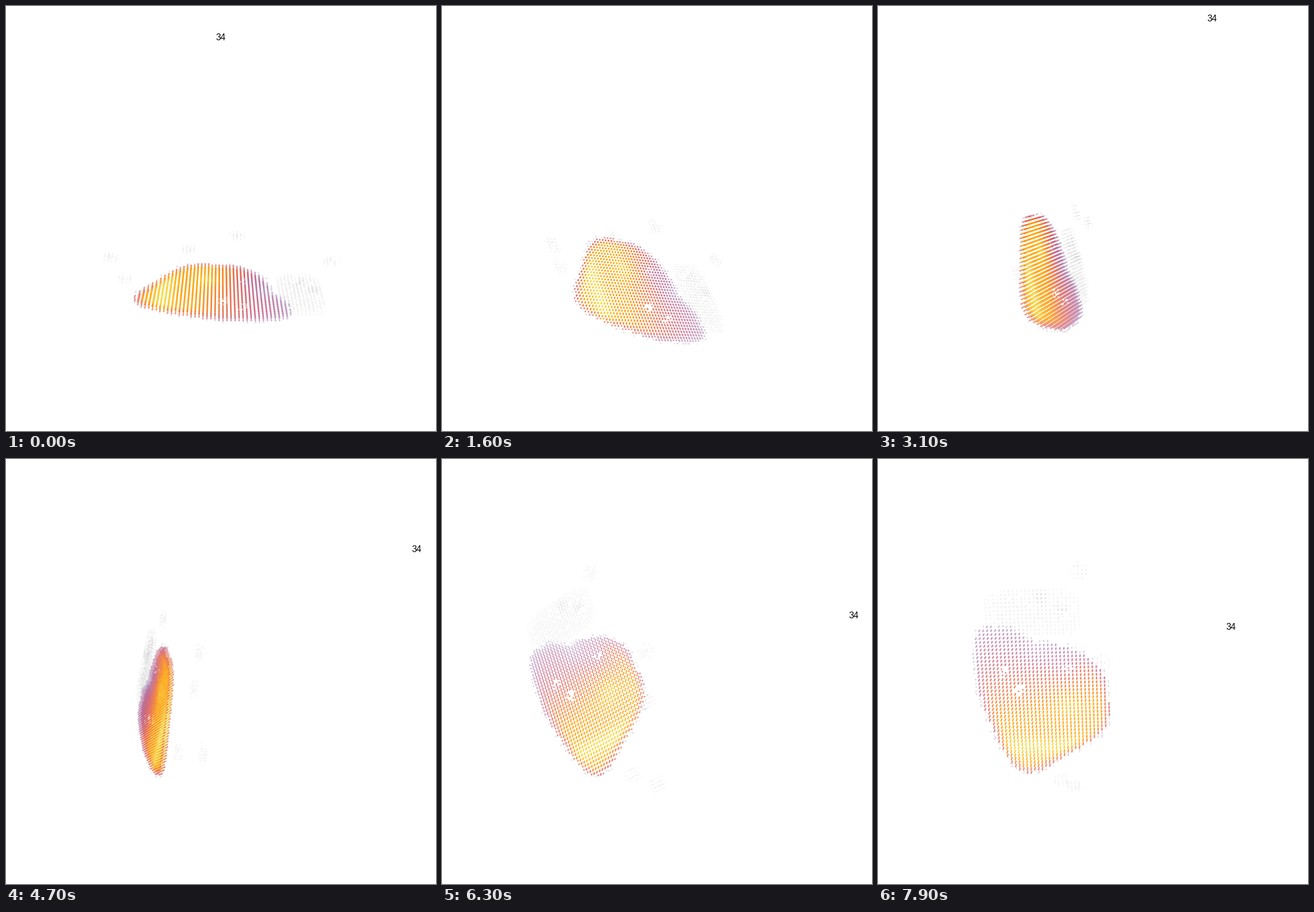
These frames come from a looping animation (753x744 px, 8000 ms). A matplotlib script:

```python
import numpy as np
import matplotlib.pyplot as plt
from matplotlib.animation import FuncAnimation
from matplotlib.path import Path

W, H, DPI = 753, 744, 100
FRAMES, INTERVAL = 80, 100
STEP = np.radians(3)            # 5 rpm at 10 fps
HALF_FOV = np.radians(15)
DIST = 1 / np.sin(HALF_FOV)
FOCAL = H / 2 / np.tan(HALF_FOV)
PITCH = 2 / np.sqrt(3) / 65
SLAB = -16 * PITCH              # height between the two heart layers
TILT = np.radians(290)
VIEW = np.array([[1, 0, 0],
                 [0, np.cos(TILT), -np.sin(TILT)],
                 [0, np.sin(TILT), np.cos(TILT)]])
LABEL_POS = np.array([[0, 0.77, 0.77]])
rng = np.random.default_rng(34)

KEYS = np.array([
    (.31, -.47), (.29, -.33), (.24, -.25), (.22, -.13), (.12, .035),
    (-.05, .08), (-.19, .055), (-.30, -.10), (-.395, -.27), (-.37, -.37),
    (-.20, -.45), (.05, -.52), (.24, -.51)])
HOLES = [(.01, -.325), (.10, -.395), (.11, -.10)]
DEBRIS = [(.54, -.04, -.22), (-.46, -.15, -.25), (-.53, -.10, -.165),
          (-.16, -.01, -.16), (.08, .05, -.10)]


def closed_curve(keys, n=16):
    """Catmull-Rom spline through the key points."""
    t = np.linspace(0, 1, n, endpoint=False)[:, None]
    a, b, c, d = (np.roll(keys, s, 0)[:, None] for s in (1, 0, -1, -2))
    curve = b + t / 2 * (c - a + t * (2 * a - 5 * b + 4 * c - d
                                      + t * (3 * (b - c) + d - a)))
    return curve.reshape(-1, 2)


RING = closed_curve(KEYS)


def bump(x, y, cx, cy, r):
    return np.exp(-((x - cx) ** 2 + (y - cy) ** 2) / (2 * r * r))


def lattice(lo, hi):
    k = np.arange(-32.5, 33) * PITCH
    axes = [k[(k >= a) & (k <= b)] for a, b in zip(lo, hi)]
    return np.stack(np.meshgrid(*axes, indexing="ij"), -1).reshape(-1, 3)


def in_heart(pts):
    return Path(RING).contains_points(pts[:, :2])


def heart():
    pts = lattice((-.45, -.58, SLAB - PITCH), (.37, .12, SLAB + PITCH))
    x, y = pts[:, 0], pts[:, 1]
    inside = in_heart(pts)
    edge = np.hypot(*(pts[:, None, :2] - RING).transpose(2, 0, 1)).min(1)
    noise = rng.random((3, len(x)))

    v = np.minimum(.69 - x + .18 * (y + .2), .79)
    v += .12 * np.exp(-((x + .27) / .05) ** 2)
    v += .08 * bump(x, y, -.06, -.11, .05)
    v -= .17 * bump(x, y, .20, -.23, .05) + .15 * bump(x, y, .13, -.12, .04)
    v *= .68 + .32 * np.clip(edge / .04, 0, 1)
    v += .04 * (noise[0] - .5)
    v = np.where(inside, v, .05 + .12 * noise[0])

    keep = inside | ((edge < .016) & (noise[1] < .5))
    for cx, cy in HOLES:
        keep &= (np.hypot(x - cx, y - cy) > .022) | (noise[2] < .5)
    return pts[keep], v[keep]


def haze(centre, radii, strength, fill, power=2):
    """Faint lattice points in a soft-edged block."""
    c, r = np.array(centre), np.array(radii)
    pts = lattice(c - r, c + r)
    q = (abs((pts - c) / r)[:, :2] ** power).sum(1)
    hidden = in_heart(pts) & (pts[:, 2] < SLAB + PITCH)
    keep = (q < 1) & ~hidden & (rng.random(len(q)) < fill)
    v = strength * (1 - .5 * q) * rng.uniform(.7, 1.2, len(q))
    return pts[keep], v[keep]


def base_haze():
    pts, v = haze((.37, -.25, SLAB), (.11, .22, PITCH), .045, .8, 4)
    x, y = pts[:, 0], pts[:, 1]
    v += .07 * (bump(x, y, .44, -.21, .018) + bump(x, y, .38, -.115, .018))
    return pts, v


def spin(angle):
    """Rotation about the axis (1, 1, 1)."""
    turn = angle + np.radians([0, 120, -120])
    a, b, c = (1 + 2 * np.cos(turn)) / 3
    return np.array([[a, b, c], [c, a, b], [b, c, a]])


def project(pts, angle):
    x, y, z = VIEW @ spin(angle) @ pts.T
    s = FOCAL / (DIST - z)
    return np.column_stack((W / 2 + s * x, H / 2 - s * y)), z


parts = [heart(), base_haze()]
parts += [haze(c, (.04, .05, PITCH), .05, .7) for c in DEBRIS]
points = np.vstack([p for p, _ in parts])
values = np.clip(np.concatenate([v for _, v in parts]), .02, .97)
colors = plt.get_cmap("inferno")(values)
colors[:, 3] = values

fig = plt.figure(figsize=(W / DPI, H / DPI), dpi=DPI, facecolor="white")
ax = fig.add_axes([0, 0, 1, 1])
ax.set(xlim=(0, W), ylim=(H, 0))
ax.axis("off")
dots = ax.scatter(points[:, 0], points[:, 1], s=(3.1 * 72 / DPI) ** 2,
                  c=colors, linewidths=0)
label = ax.text(0, 0, "34", family="Liberation Sans", size=15.5 * 72 / DPI,
                color="black", ha="center", va="center")


def update(i):
    xy, depth = project(points, i * STEP)
    order = np.argsort(depth)
    dots.set_offsets(xy[order])
    dots.set_facecolors(colors[order])
    (lx, ly), = project(LABEL_POS, i * STEP)[0]
    label.set_position((lx, ly + .6))
    label.set_visible(ly > 1)
    return dots, label


anim = FuncAnimation(fig, update, frames=FRAMES, interval=INTERVAL,
                     repeat=True, repeat_delay=0)
plt.show()
```
